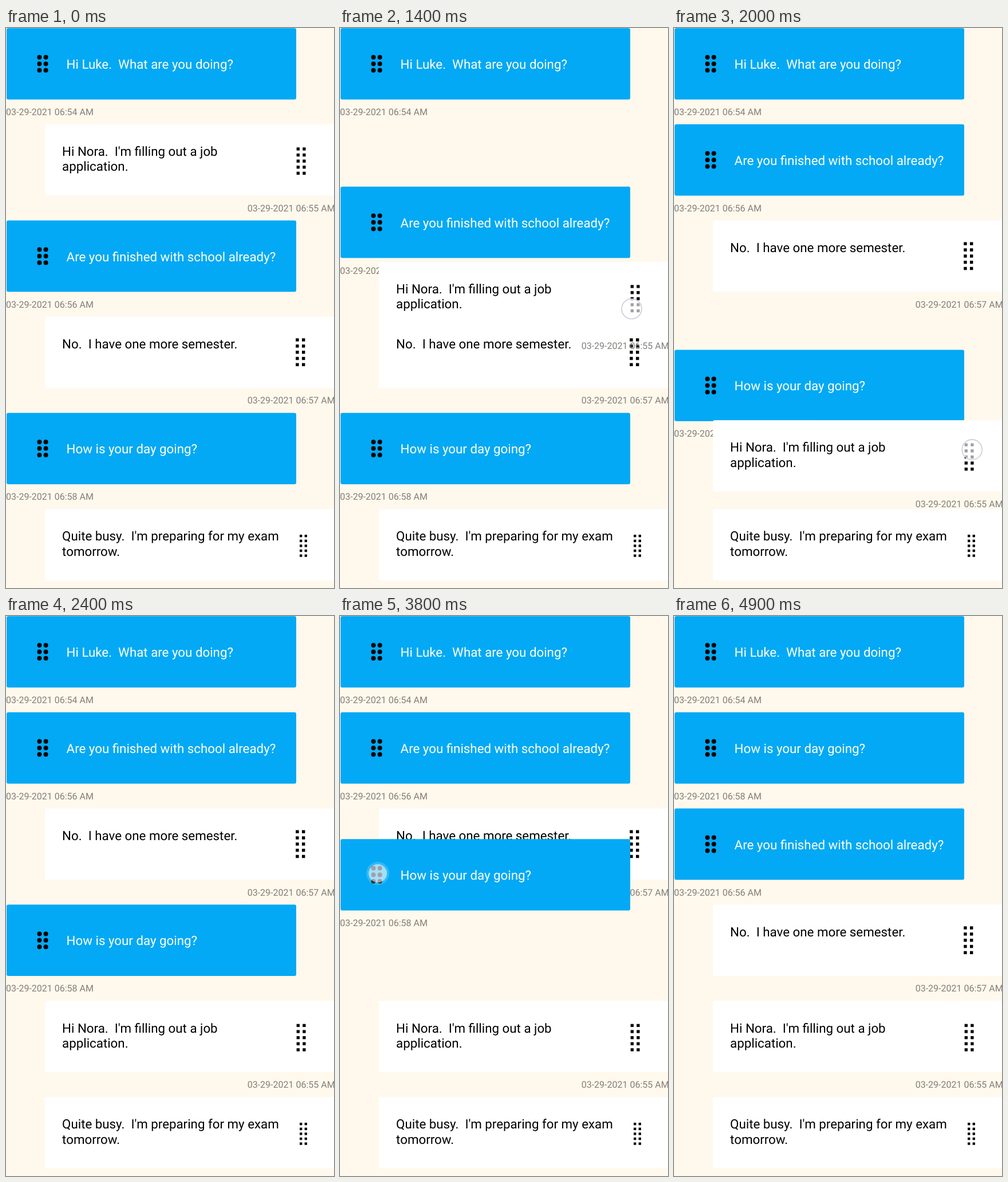
An HTML page that plays this animation: 573 by 977 pixels, repeating every 5800 ms.

```html
<!DOCTYPE html>
<html lang="en">
<head>
<meta charset="utf-8">
<title>Reorderable chat</title>
<style>
  html, body { margin: 0; width: 100%; height: 100%; overflow: hidden; background: #fff8ec; }
  svg { display: block; font-family: Roboto, Arial, sans-serif; text-rendering: geometricPrecision; }
  .msg { font-size: 22.3px; }
  .time { font-size: 16px; fill: #827f7a; }
</style>
</head>
<body>
<svg id="stage" width="573" height="977" viewBox="0 0 573 977">
  <rect width="573" height="977" fill="#fff8ec"/>
</svg>
<script>
const NS = 'http://www.w3.org/2000/svg';
const LOOP = 5800, STEP = 100, PITCH = 167.8, CARD = 124.5;
const stage = document.getElementById('stage');
const slot = n => n * PITCH;

function add(parent, tag, attrs, text) {
  const el = document.createElementNS(NS, tag);
  for (const k in attrs) el.setAttribute(k, attrs[k]);
  if (text) el.textContent = text.replace(/ {2}/g, '\u00a0 ');
  parent.appendChild(el);
  return el;
}

function card(x, fill, timeX, minute) {
  const g = add(stage, 'g', {});
  add(g, 'rect', { x, y: 0.2, width: 506, height: CARD, rx: 3, fill });
  add(g, 'text', { x: timeX, y: 152, class: 'time' }, `03-29-2021 06:${minute} AM`);
  return g;
}

function received(text, minute) {
  const g = card(1, '#03a9f4', 0, minute);
  for (let i = 0; i < 6; i++) {
    add(g, 'circle', { cx: 58.4 + (i % 2) * 11.2, cy: 51 + (i >> 1) * 11.4, r: 4 });
  }
  add(g, 'text', { x: 105.6, y: 71, class: 'msg', fill: '#fff' }, text);
  return g;
}

// The grip is two columns of five squares around (cx, cy).
function sent(lines, minute, cx, cy, size) {
  const g = card(68, '#fff', 421.7, minute);
  for (let i = 0; i < 10; i++) {
    add(g, 'rect', {
      x: cx + (i % 2 * 2 - 1.5) * size, y: cy + ((i >> 1) * 2 - 4.5) * size,
      width: size, height: size
    });
  }
  lines.forEach((line, i) => add(g, 'text', { x: 98.1, y: 55.4 + i * 26.1, class: 'msg' }, line));
  return g;
}

// Later items are painted on top; the dragged ones come last.
const hello = received('Hi Luke.  What are you doing?', 54);
const school = received('Are you finished with school already?', 56);
const semester = sent(['No.  I have one more semester.'], 57, 514.3, 62.3, 5.4);
const exam = sent(["Quite busy.  I'm preparing for my exam", 'tomorrow.'], 59, 519.5, 64.4, 4.3);
const day = received('How is your day going?', 58);
const job = sent(["Hi Nora.  I'm filling out a job", 'application.'], 55, 515.6, 64.4, 5.3);

const touch = add(stage, 'g', {});
const halo = add(touch, 'circle', { fill: 'none' });
const disc = add(touch, 'circle', { fill: '#fff', 'fill-opacity': 0.63 });

// Smooth curve through [time, ...values] points, at rest at both ends.
function glide(points, t) {
  const last = points.length - 1;
  t = Math.min(points[last][0], Math.max(points[0][0], t));
  const i = Math.min(last - 1, points.findLastIndex(p => p[0] <= t));
  const a = points[i], b = points[i + 1], span = b[0] - a[0], u = (t - a[0]) / span;
  const slope = (k, j) => k === 0 || k === last ? 0 :
    (points[k + 1][j] - points[k - 1][j]) / (points[k + 1][0] - points[k - 1][0]);
  const mix = u * u * (3 - 2 * u);
  return a.slice(1).map((v, n) => v + (b[n + 1] - v) * mix +
    span * u * (1 - u) * ((1 - u) * slope(i, n + 1) - u * slope(i + 1, n + 1)));
}

// Accelerate-decelerate shift by whole slots.
function shift(t, start, slots) {
  const p = Math.min(1, Math.max(0, (t - start) / 250));
  return slot(slots) * (1 - Math.cos(Math.PI * p)) / 2;
}

const jobDrag = [[800, slot(1)], [1400, 407.8], [1700, 562.6], [2000, 684], [2400, slot(4)]];
const dayDrag = [[3600, slot(3)], [3800, 389], [4200, 191.3], [4500, slot(1)]];

const touches = [
  { from: 800, to: 2400, r: 17, ring: { r: 17.3, stroke: '#c3cad3', 'stroke-width': 2, 'stroke-opacity': 0.95 },
    path: [[800, 515, 233], [1400, 509.5, 490], [1700, 518.5, 657], [2300, 521, 768]] },
  { from: 3600, to: 4900, r: 16, ring: { r: 18, stroke: '#fff', 'stroke-width': 4, 'stroke-opacity': 0.18 },
    path: [[3600, 64, 566], [3800, 66, 449], [4200, 76, 264], [4500, 73, 227]] }
];

function place(el, x, y) {
  el.setAttribute('transform', `translate(${x.toFixed(2)} ${y.toFixed(2)})`);
}

function drawTouch(t) {
  const now = touches.find(o => t >= o.from && t < o.to);
  touch.setAttribute('visibility', now ? 'visible' : 'hidden');
  if (!now) return;
  place(touch, ...glide(now.path, t));
  touch.setAttribute('opacity', t >= now.to - STEP ? 0.4 : 1);
  disc.setAttribute('r', now.r);
  for (const k in now.ring) halo.setAttribute(k, now.ring[k]);
}

function draw(t) {
  place(hello, 0, 0);
  place(school, 0, slot(2) + shift(t, 1299, -1) + shift(t, 4112, 1));
  place(semester, 0, slot(3) + shift(t, 1445, -1) + shift(t, 3860, 1));
  place(exam, 0, slot(5));
  place(job, 0, glide(jobDrag, t)[0]);
  place(day, 0, glide(dayDrag, t)[0] + slot(1) + shift(t, 1850, -1));
  drawTouch(t);
}

const began = performance.now();
function tick() {
  const t = (performance.now() - began) % LOOP;
  draw(Math.floor(t / STEP) * STEP);
  requestAnimationFrame(tick);
}
tick();
</script>
</body>
</html>
```
